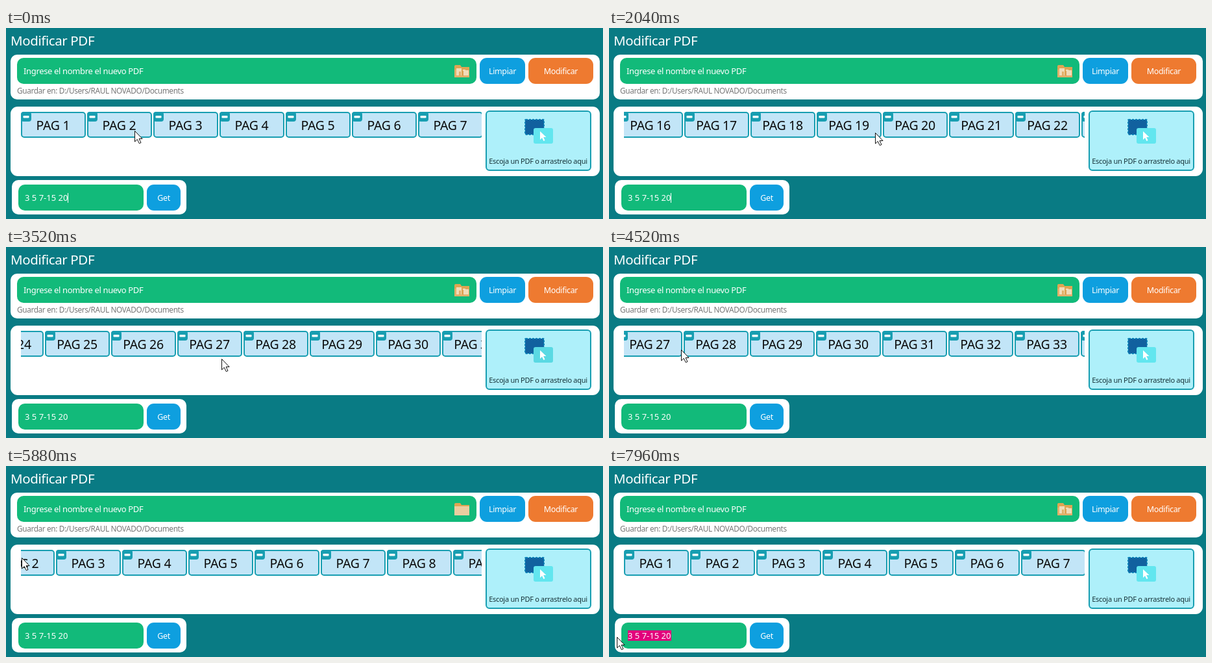
Animation, 920 px wide and 294 px high, one loop 8 s. Source, as an HTML page:

```html
<!DOCTYPE html>
<html lang="es">
<head>
<meta charset="utf-8">
<title>Modificar PDF</title>
<style>
  html, body { margin: 0; width: 100%; height: 100%; overflow: hidden; background: #097b84; }
  svg { display: block; width: 920px; height: 294px; }
  text { font: 13px "Noto Sans", "Open Sans", sans-serif; fill: #fff; letter-spacing: -.35px; white-space: pre; }
  .title { font-size: 20.5px; letter-spacing: -.4px; }
  .button { font-size: 12.5px; text-anchor: middle; }
  .path { font-size: 11.8px; letter-spacing: -.36px; fill: #777; }
  .hint { font-size: 11px; letter-spacing: -.28px; text-anchor: middle; fill: #173238; }
  .page { font-size: 19.5px; letter-spacing: -.3px; text-anchor: middle; fill: #0b0b0b; }
  .range { letter-spacing: 0; }
</style>
</head>
<body>
<svg id="stage" viewBox="0 0 920 294"></svg>
<script>
const LOOP = 8000, STEP = 40, PITCH = 102, PAGES = 40;
const GREEN = '#12ba7a', BLUE = '#0e9fdf', TEAL = '#189eb1';

const box = (x, y, w, h, r, fill, extra = '') =>
  `<rect x="${x}" y="${y}" width="${w}" height="${h}" rx="${r}" fill="${fill}" ${extra}/>`;
const label = (x, y, cls, words) => `<text x="${x}" y="${y}" class="${cls}">${words}</text>`;
const button = (x, y, w, fill, words) =>
  box(x, y, w, 40, 11, fill) + label(x + w / 2, y + 25, 'button', words);
const border = `stroke="${TEAL}" stroke-width="2"`;

const page = n => `<g transform="translate(${23 + PITCH * (n - 1)} 129)">
  ${box(1, 1, 98, 38, 4, '#c2e5f7', border)}
  ${box(0, 0, 16, 15, 4, TEAL)}${box(3.5, 6, 9, 3.5, 1, '#fff')}
  ${label(49.5, 28, 'page', 'PAG ' + n)}</g>`;

const folder = `<path d="M691 59q0-2 2-2h7l2 3h12v16h-23z" fill="#dfa552"/>
  <g id="papers"><path d="M694 62h8v13h-8zM704 64h9v11h-9z" fill="#f1dcb9"/>
  <path d="M691 64h3v9h4v-6h3v6h13v3h-23z" fill="#e2b06a"/>
  <path d="M704.5 66v8M708 64.500h6" stroke="#d8a15a" fill="none"/></g>
  <path id="cover" d="M691 62h23v14h-23z" fill="#ebcda0"/>`;

const dropZone = box(740, 128, 161, 91, 5, '#aef0fa', border) +
  box(800, 141, 29, 23, 1, '#11619f', 'stroke="#0b82b8" stroke-width="2" stroke-dasharray="3 2"') +
  box(813, 154, 30, 24, 3, '#62e6ef', 'id="tile"') +
  '<path d="M823 159v13l3-3 2.500 5 2-1-2.300-5h4.300z" fill="#fff"/>' +
  label(820, 209, 'hint', 'Escoja un PDF o arrastrelo aqui');

const pages = Array.from({ length: PAGES }, (_, i) => page(i + 1)).join('');

stage.innerHTML = `<clipPath id="window">${box(23, 126, 710, 46, 0, '#fff')}</clipPath>
  ${box(0, 0, 920, 294, 0, '#097b84')}
  ${label(7, 27, 'title', 'Modificar PDF')}
  ${box(7, 41, 908, 69, 10, '#fff')}
  ${box(17, 46, 708, 40, 10, GREEN)}
  ${label(27, 71, '', 'Ingrese el nombre el nuevo PDF')}
  ${folder}
  ${button(730, 46, 70, BLUE, 'Limpiar')}
  ${button(805, 46, 100, '#ee7a30', 'Modificar')}
  ${label(17, 101, 'path', 'Guardar en: D:/Users/RAUL NOVADO/Documents')}
  ${box(7, 121, 908, 107, 11, '#fff')}
  <g clip-path="url(#window)"><g id="strip">${pages}</g></g>
  ${dropZone}
  ${box(9, 234, 269, 53, 10, '#fff')}
  ${box(19, 241, 193, 40, 10, GREEN)}
  ${box(29, 253, 0, 16, 0, '#e2007c', 'id="selection"')}
  ${label(29, 266, 'range', '3 5 7-15 20')}
  ${box(95, 254, 1, 15, 0, '#fff', 'id="caret"')}
  ${button(217, 241, 52, BLUE, 'Get')}
  <path id="pointer" d="M.5.5v16.500l3.800-3.600 3 6.300 2.700-1.200-2.900-6h5z" fill="#fff" stroke="#111"/>`;

// Each key is [time, ...values], joined by straight segments.
const scrollKeys = [[0, 0], [160, 0], [1440, 1259], [2840, 1913], [3520, 2411],
  [4520, 2662], [5880, 150], [6160, 0], [LOOP, 0]];
const pointerKeys = [[0, 198, 158], [1440, 398, 160], [2840, 427, 163], [3520, 332, 172],
  [4520, 111, 158], [5880, 24, 141], [6400, 40, 160], [7200, 98, 259],
  [7440, 98, 260], [7880, 12, 263], [LOOP, 12, 263]];

function at(keys, time) {
  const i = keys.findIndex(key => key[0] > time);
  const [a, b] = [keys[i - 1], keys[i]];
  const k = (time - a[0]) / (b[0] - a[0]);
  return a.slice(1).map((v, j) => Math.round(v + (b[j + 1] - v) * k));
}

const el = id => document.getElementById(id);
const show = (id, on) => el(id).setAttribute('visibility', on ? 'visible' : 'hidden');

function draw(now) {
  const t = Math.floor(now % LOOP / STEP) * STEP;
  const [scroll] = at(scrollKeys, t);
  const [x, y] = at(pointerKeys, t);
  el('strip').setAttribute('transform', `translate(${-scroll} 0)`);
  el('pointer').setAttribute('transform', `translate(${x} ${y})`);

  const from = t >= 7440 ? Math.max(29, Math.min(96, x)) : 96;
  el('selection').setAttribute('x', from);
  el('selection').setAttribute('width', 96 - from);
  show('caret', from === 96 && (t + 410) % 1060 < 530);

  const closed = t >= 5720 && t < 6040;
  show('cover', closed);
  show('papers', !closed);
  const dim = Math.abs(t % 2080 - 1440) < 200;
  el('tile').setAttribute('fill', dim ? '#5ad9e3' : '#62e6ef');
}

const start = performance.now();
(function tick() {
  draw(performance.now() - start);
  requestAnimationFrame(tick);
})();
</script>
</body>
</html>
```
